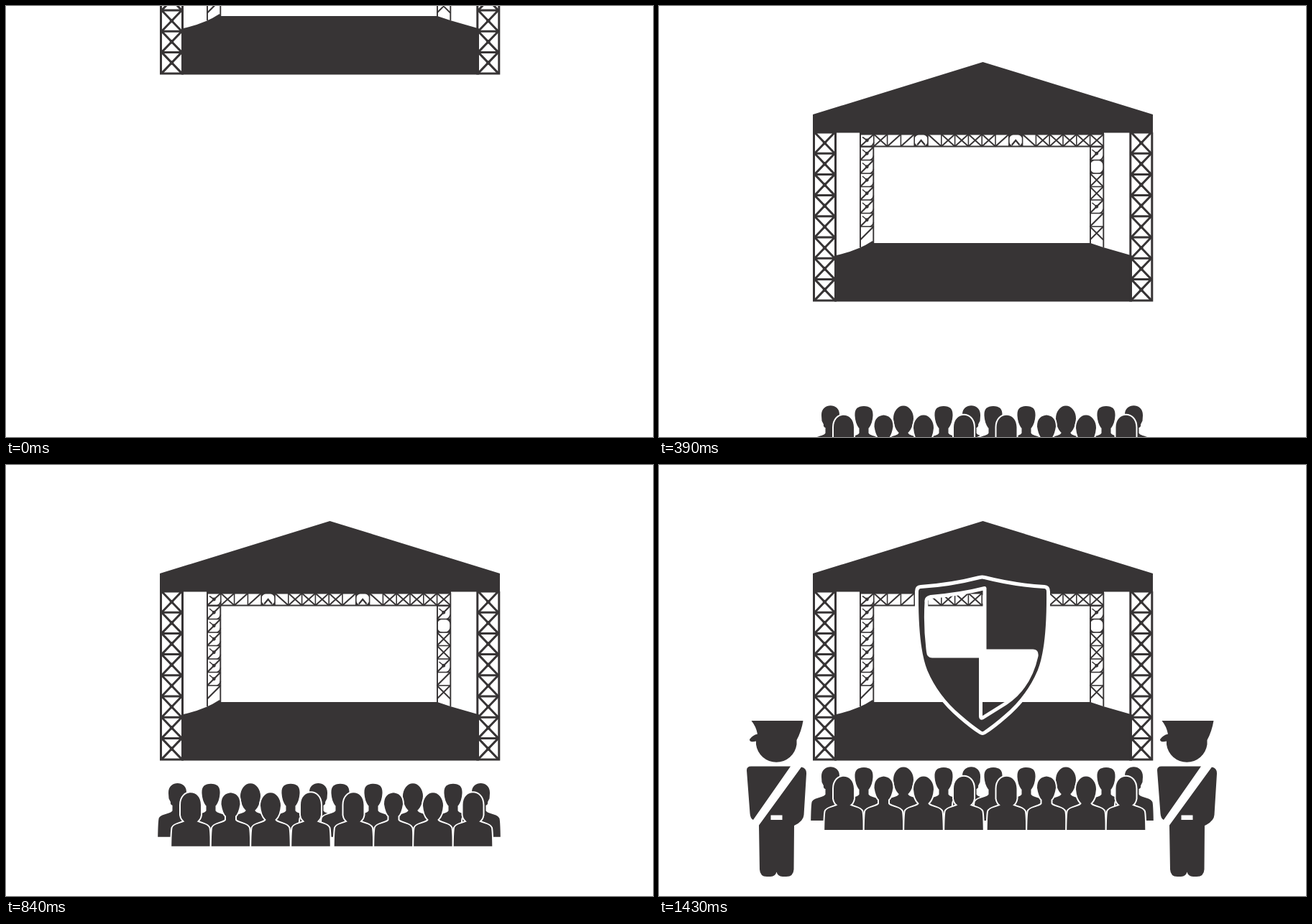
These frames come from a looping animation (900 px wide and 600 px high, 1.96 s). An HTML page:

```html
<!DOCTYPE html>
<html lang="en">
<head>
<meta charset="utf-8">
<title>Open-air event security</title>
<style>
  html, body { margin: 0; width: 100%; height: 100%; overflow: hidden; background: #fff; }
  svg { display: block; width: 100%; height: 100%; fill: #373435; }
  .beam { fill: none; stroke: #373435; }
  .person { stroke: #fff; stroke-width: 4; paint-order: stroke; }
</style>
</head>
<body>
<svg viewBox="0 0 900 600">
  <defs>
    <g id="guard">
      <path d="M128.500 356H200.500Q198 371 191.500 383V389A28.500 28.500 0 0 1 135 389V384.500Q126 387 126 382Q130 376 137 374.500Q135 364 128.500 356Z"/>
      <path d="M122 425Q122 419.500 128 419.500H183L131 494Q127 492 126.500 485Z"/>
      <path d="M198 420.500Q205.500 422 205 430L201.500 487Q201 496 188 502L187.500 563Q187 573 177 573H172Q165 573 163.500 566.500Q162 573 155 573H150Q140.500 573 140 563L139 501.500Z"/>
      <path d="M155.500 487.500H171.500V494H155.500Z" fill="#fff"/>
    </g>
  </defs>
  <g id="stage">
    <path d="M214 151L450.500 78 687 151V176.500H619V178.500H279V176.500H214Z"/>
    <path d="M244 411.500V347.500Q276 341 297 327L299 330H600L618 336 658 347.500V411.500Z"/>
  </g>
  <g id="crowd"></g>
  <use id="leftGuard" href="#guard"/>
  <use id="rightGuard" href="#guard" x="571"/>
  <path id="shield" fill-rule="evenodd" stroke="#fff" stroke-width="5" stroke-linejoin="round"
    d="M446 156.500Q449.500 155.500 453 156.500Q494 167 536 169.500Q541.500 170 541.500 176C542 225 539 262 529 287C518 313 502 333 482 350Q466 364 453 372.500Q450 374.500 447 372.500Q434 364 418 350C398 333 382 313 371 287C361 262 358 225 358.500 176Q358.500 170 364 169.500Q405 167 446 156.500Z
       M372 191Q371 185 378 183.500Q420 180 453 171.500V259H520Q526 259 525 266C518 298 503 318 482 332L450 352Q447.500 353 447.500 350V266H380Q375 266 374.500 260Q370 225 372 191Z"/>
</svg>
<script>
const LOOP = 1960, STEP = 30;
const STAGE_STEPS = 12, STAGE_RISE = 316;
const CROWD_START = 13, CROWD_STEPS = 18, CROWD_DROP = 136;
const LEFT_GUARD_AT = 960, RIGHT_GUARD_AT = 1130, SHIELD_AT = 1430;

const byId = id => document.getElementById(id);
const stage = byId('stage'), crowd = byId('crowd');
const add = (parent, markup) => parent.insertAdjacentHTML('beforeend', markup);
const beam = (d, width) => add(stage, `<path class="beam" d="${d}" stroke-width="${width}"/>`);

// Heavy front towers: two rails, cross-braced cells.
function tower(left) {
  const right = left + 30, size = 29.2, top = 176;
  beam(`M${left} ${top}V411.5M${right} ${top}V411.5M${left} 410H${right}`, 3);
  for (let i = 0; i < 8; i++) {
    const y = top + i * size, end = y + size;
    beam(`M${left} ${y}H${right}M${left + 1} ${y}L${right - 1} ${end}M${right - 1} ${y}L${left + 1} ${end}`, 3);
    add(stage, `<circle cx="${left + 15}" cy="${y + size / 2}" r="2.7"/>`);
  }
}

// Bracing of one light truss cell; the worn cells have rounded corners.
function brace(kind, x, y, w, h) {
  const r = x + w, b = y + h, cx = x + w / 2, cy = y + h / 2;
  if (kind === 'x') return beam(`M${x} ${y}L${r} ${b}M${r} ${y}L${x} ${b}`, 1.9);
  if (kind === '/' || kind === 'd') beam(`M${x} ${b}L${r} ${y}`, 2.1);
  if (kind === '\\') beam(`M${x} ${y}L${r} ${b}`, 2.1);
  if (kind === '^') beam(`M${x + 4} ${b - 2}L${cx} ${cy}L${r - 4} ${b - 2}`, 2.2);
  if (kind === 'd') {
    add(stage, `<circle cx="${cx}" cy="${cy}" r="2.4"/>`);
    beam(`M${r - 5} ${b}Q${r - 1} ${b - 1} ${r} ${b - 6}M${cx} ${cy}L${x + 3} ${y + 4}`, 1.6);
  }
  if (kind === 'o' || kind === '^')
    add(stage, `<path fill-rule="evenodd" d="M${x} ${y}H${r}V${b}H${x}ZM${x} ${cy}C${x} ${y - 3} ${r} ${y - 3} ${r} ${cy}C${r} ${b + 3} ${x} ${b + 3} ${x} ${cy}Z"/>`);
}

function lightTruss() {
  const cell = 18.8, rung = 18.5, left = 280, right = 599.5;
  beam(`M280 178V336M298.300 195V330M600 195V331M618.300 178V336M279 178.500H619M280 195.500H618`, 1.9);
  [...'dx//^\\xxxx/^\\xxxxx'].forEach((kind, i) => {
    const x = left + i * cell;
    beam(`M${x} 178V196`, 1.6);
    brace(kind, x, 178.5, cell, 17);
  });
  const column = (x, kinds) => [...kinds].forEach((kind, i) => {
    const y = 196 + i * rung;
    beam(`M${x} ${y}H${x + 18.5}`, 1.6);
    brace(kind, x, y, 18.5, rung);
  });
  column(left, 'dddddd/');
  column(right, 'doxxd/x');
}

const heads = {
  round: 'M-14 18A14 18 0 0 1 14 18Q13 31 7 37H-7Q-13 31 -14 18Z',
  small: 'M-13 16C-13 4 -7 1 0 0C7 1 13 4 13 16Q11 29 6 33H-6Q-11 29 -13 16Z',
  flat: 'M-12.500 14C-13 4 -9 1 0 0.500C9 1 13 4 12.500 14Q12 24 7 31H-7Q-12 24 -12.500 14Z',
  long: 'M-14 17C-14 -5.500 14 -5.500 14 17L14 31Q13 38 7 41H-7Q-13 38 -14 31Z',
  profile: 'M-12 14C-13 -4.500 13 -4.500 13 12Q12 23 8 31H-5Q-10 30 -9 26L-11.500 21Z'
};
const body = 'M-6.500 28H6.500V38C9 43 23 42 25.500 49Q26.500 54 26.800 74.500H-26.800Q-26.500 54 -25.500 49C-23 42 -9 43 -6.500 38Z';

function person(x, y, head, flip = 1) {
  add(crowd, `<path class="person" transform="translate(${x} ${y}) scale(${flip} 1)" d="${heads[head]}${body}"/>`);
}

function audience() {
  const back = [[238, 'profile'], [285, 'flat'], [340, 'round'], [396, 'flat'], [435, 'profile', -1],
    [465, 'flat'], [511, 'flat'], [566, 'round'], [622, 'flat'], [661, 'profile', -1]];
  const front = [[257, 'long'], [312.5, 'small'], [368, 'round'], [424, 'long'],
    [483.5, 'long'], [539, 'small'], [594, 'round'], [649.5, 'long']];
  back.forEach(([x, head, flip]) => person(x, 420.5, head, flip));
  front.forEach(([x, head]) => person(x, 433.5, head));
}

const show = (element, visible) => { element.style.display = visible ? '' : 'none'; };
const slide = (element, y) => element.setAttribute('transform', `translate(0 ${y})`);

function draw(time) {
  const step = Math.floor(time / STEP);
  slide(stage, -STAGE_RISE * Math.max(0, 1 - step / STAGE_STEPS));
  slide(crowd, CROWD_DROP * Math.max(0, 1 - (step - CROWD_START) / CROWD_STEPS));
  show(crowd, step >= CROWD_START);
  show(byId('leftGuard'), time >= LEFT_GUARD_AT);
  show(byId('rightGuard'), time >= RIGHT_GUARD_AT);
  show(byId('shield'), time >= SHIELD_AT);
}

tower(215.5);
tower(655.8);
lightTruss();
audience();

const start = performance.now();
function tick() {
  draw((performance.now() - start) % LOOP);
  requestAnimationFrame(tick);
}
tick();
</script>
</body>
</html>
```
